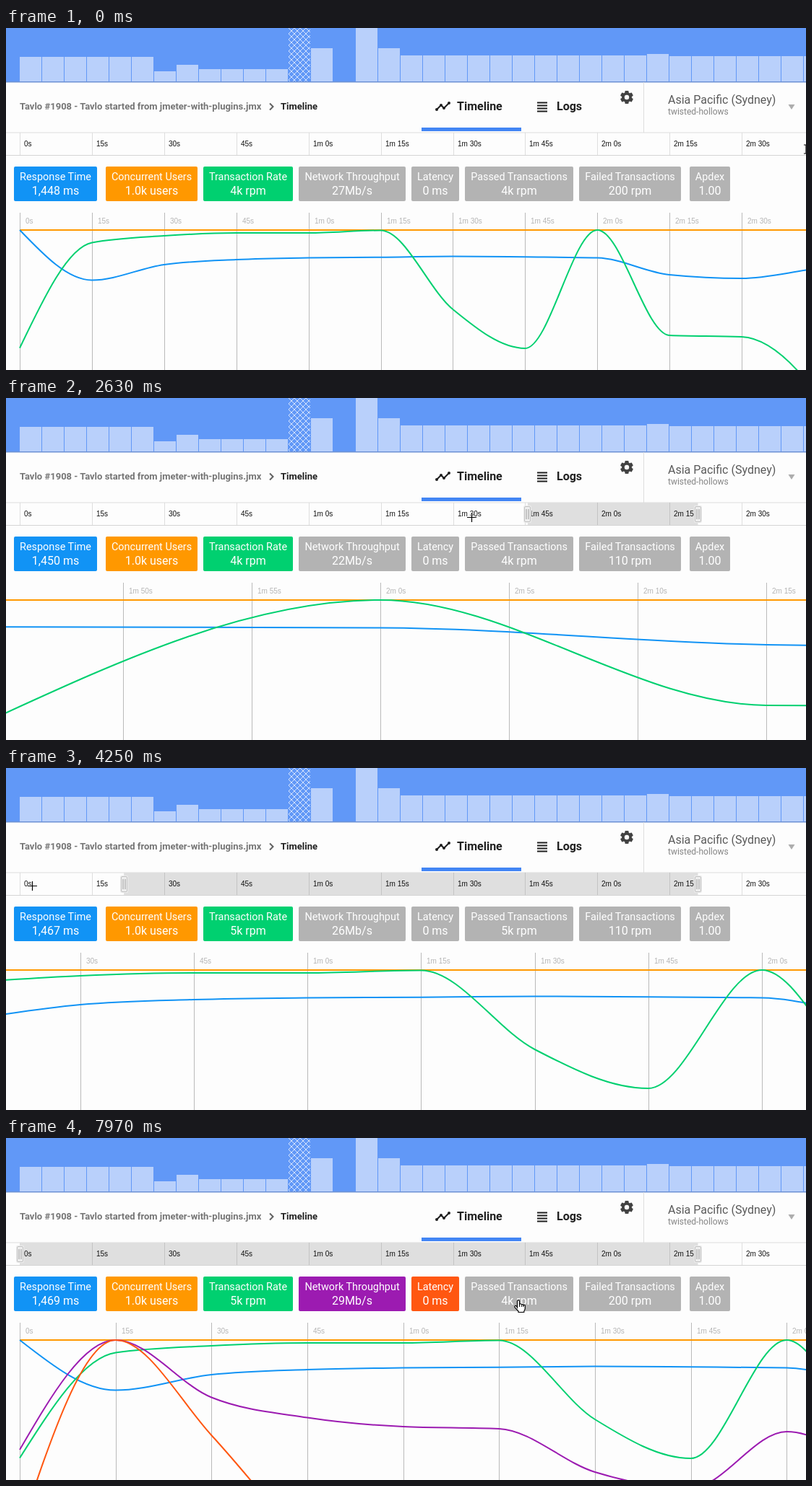
Write an HTML page that moves like this. It is 1107x474 px and loops after 8000 ms.

```html
<!DOCTYPE html>
<html lang="en">
<head>
<meta charset="utf-8">
<title>Timeline</title>
<style>
  html, body { margin: 0; width: 100%; height: 100%; overflow: hidden; background: #fdfdfd; }
  svg { display: block; width: 100%; height: 100%; }
  text { font-family: Roboto, sans-serif; white-space: pre; }
  .axis { font: 10px "Liberation Sans", Arial, sans-serif; }
  .curve { fill: none; stroke-width: 2; }
</style>
</head>
<body>
<svg viewBox="0 0 1107 474">
  <defs>
    <pattern id="hatch" x="391" width="8" height="8" patternUnits="userSpaceOnUse">
      <path d="M0 0L8 8M8 0L0 8" stroke="#d5e3fd"/>
    </pattern>
  </defs>
  <g id="fixed"></g>
  <g id="live"></g>
</svg>
<script>
const LOOP = 8000, TICK = 147.6;
const LEFT = 19, SPAN = 1247, PX_PER_S = 6.66, SEL_END = 957.5, SAMPLE = 15;
const DRAG = 1885, NETWORK_ON = 6160, LATENCY_ON = 7340;
const GREY = '#b3b3b3', DARK = '#212121';

// Key points: time, then values
const HANDLE = [[DRAG, 950], [2036, 925], [3217, 519], [3808, 305], [4700, LEFT]];
const POINTER = [
  [0, 1107, 168], [860, 707, 166], [1290, 707, 166], [1590, 965, 166], [2036, 865, 167],
  [3217, 423, 164], [3808, 203, 163], [4400, -20, 163], [5060, -20, 170],
  [5870, 491, 235], [6500, 491, 235], [6760, 608, 237], [LATENCY_ON, 608, 237], [7940, 711, 233]
];
// Response ms, transactions k, network Mb, passed k, failed tens
const STATS = [
  [2036, 1448, 4, 27, 4, 20], [3217, 1452, 4, 18, 4, 2],
  [3808, 1465, 5, 24, 5, 4], [4840, 1469, 5, 29, 4, 20]
];

// One height per sample
const SERIES = {
  users: { color: '#ff9800', from: 0, y: Array(13).fill(280) },
  response: { color: '#1193f5', from: 0, y: [280, 349.5, 328, 321, 318.5, 317.7, 316.5, 317.3, 318.5, 342, 347, 334, 322] },
  rate: { color: '#00d070', from: 0, y: [443.5, 297.5, 288, 284, 284, 280.5, 390, 444, 280, 426, 428, 502, 690] },
  network: { color: '#9c1bb1', from: NETWORK_ON, y: [432, 280, 359.5, 387.5, 400, 403, 463, 485, 407, 480] },
  latency: { color: '#ff5711', from: LATENCY_ON, y: [545, 280, 412, 570] }
};
const CARDS = [
  ['Response Time', 11, 115, 'response'], ['Concurrent Users', 138, 127, 'users'],
  ['Transaction Rate', 273, 124, 'rate'], ['Network Throughput', 405, 148, 'network'],
  ['Latency', 561, 66, 'latency'], ['Passed Transactions', 635, 150],
  ['Failed Transactions', 793, 141], ['Apdex', 946, 56]
];

const rect = (x, y, w, h, fill, extra = '') =>
  `<rect x="${x}" y="${y}" width="${w}" height="${h}" fill="${fill}" ${extra}/>`;
const line = (d, stroke, width = 1) =>
  `<path d="${d}" fill="none" stroke="${stroke}" stroke-width="${width}"/>`;
const text = (s, x, y, size, fill, extra = '') =>
  `<text x="${x}" y="${y}" font-size="${size}" fill="${fill}" ${extra}>${s}</text>`;
const axisText = (s, x, y, fill) => `<text class="axis" x="${x}" y="${y}" fill="${fill}">${s}</text>`;

function at(keys, t, col = 1) {
  const i = keys.findIndex(k => k[0] >= t);
  if (i < 0) return keys[keys.length - 1][col];
  if (i === 0) return keys[0][col];
  const a = keys[i - 1], b = keys[i];
  return a[col] + (b[col] - a[col]) * (t - a[0]) / (b[0] - a[0]);
}

// The screen refreshes at a fixed, coarse rate
const snap = t => Math.max(0, Math.floor((t + 40) / TICK) * TICK - 30);

function clock(s) {
  s = Math.floor(s + 1e-6);
  return (s < 60 ? '' : Math.floor(s / 60) + 'm ') + s % 60 + 's';
}

// Monotone cubic through evenly spaced points
function slopes(y) {
  const d = y.slice(1).map((v, i) => v - y[i]), n = d.length;
  if (n < 2) return [d[0], d[0]];
  const m = [];
  for (let i = 1; i < n; i++) {
    const a = d[i - 1], b = d[i];
    m[i] = (Math.sign(a) + Math.sign(b)) * Math.min(Math.abs(a), Math.abs(b), Math.abs(a + b) / 4);
  }
  m[0] = (3 * d[0] - m[1]) / 2;
  m[n] = (3 * d[n - 1] - m[n - 1]) / 2;
  return m;
}

function curve(series, t0, t1, toX) {
  const first = Math.floor(t0 / SAMPLE);
  const y = series.y.slice(first, Math.ceil(t1 / SAMPLE) + 1);
  if (y.length < 2) return '';
  const m = slopes(y), x = i => toX((first + i) * SAMPLE);
  let d = `M${x(0)} ${y[0]}`;
  for (let i = 1; i < y.length; i++) {
    d += `C${x(i - 2 / 3)} ${y[i - 1] + m[i - 1] / 3} ${x(i - 1 / 3)} ${y[i] - m[i] / 3} ${x(i)} ${y[i]}`;
  }
  return `<path class="curve" d="${d}" stroke="${series.color}"/>`;
}

function banner() {
  const odd = { 6: 60, 7: 51, 12: 74, 13: 28, 14: 74, 15: 0, 16: 28, 28: 36 };
  const usual = i => i < 6 ? 40 : i < 12 ? 57 : i < 28 ? 38 : 39;
  let s = rect(0, 0, 1107, 75, '#6198f7');
  for (let i = 0; i < 36; i++) {
    const top = odd[i] ?? usual(i);
    s += rect(LEFT + 31 * i, top, 30, 74 - top, '#b9d0fb');
  }
  return s + rect(391, 0, 30, 74, 'url(#hatch)') + rect(0, 74, 1107, 1.5, '#6b90d4');
}

function gear(x, y) {
  let s = `<circle cx="${x}" cy="${y}" r="7" fill="#424242"/>`;
  for (const a of [0, 60, 120]) {
    s += rect(x - 2.6, y - 9, 5.2, 18, '#424242', `rx="1" transform="rotate(${a} ${x} ${y})"`);
  }
  return s + `<circle cx="${x}" cy="${y}" r="3.2" fill="#fdfdfd"/>`;
}

function header() {
  const bold = 'font-weight="700"';
  const dots = [[596, 113], [602, 107], [606, 111], [613, 104]];
  return text('Tavlo #1908 - Tavlo started from jmeter-with-plugins.jmx', 19, 113, 13, '#757575', bold) +
    line('M365 104.5L369.5 109L365 113.5', '#616161', 2) +
    text('Timeline', 380, 113, 13, DARK, bold) +
    line('M' + dots.join('L'), DARK, 2) +
    dots.map(([x, y]) => `<circle cx="${x}" cy="${y}" r="2" fill="${DARK}"/>`).join('') +
    text('Timeline', 624, 114, 16, DARK, bold) +
    rect(575, 138, 138, 5, '#4285f4') +
    line('M735 103.500h14m-14 4h14m-14 4h14m-14 4h14', DARK, 2) +
    text('Logs', 762, 114, 16, DARK, bold) +
    gear(859, 96) +
    rect(882, 75, 1, 70, '#dedede') +
    text('Asia Pacific (Sydney)', 916, 105, 16, '#5a5a5a') +
    text('twisted-hollows', 916, 120, 12, '#858585') +
    '<path d="M1082.5 106h9l-4.5 7z" fill="#adadad"/>' +
    rect(0, 144.5, 1107, 1, '#dedede') + rect(0, 176, 1107, 1, '#d4d4d4');
}

function grip(x) {
  x = Math.round(x - .5) + .5;
  return rect(x - 5.5, 149, 11, 24, '#ececec', 'rx="2"') +
    rect(x - 4, 150.5, 8, 21, '#eee', 'rx="1.5" stroke="#c2c2c2"') +
    line(`M${x - 1.5} 154v14M${x + 1.5} 154v14`, '#999');
}

function ruler(t) {
  const on = t >= DRAG, x = at(HANDLE, t);
  let s = on ? rect(x, 145, SEL_END - x, 31, '#dfdfdf') : '';
  for (let i = 0; i < 11; i++) {
    const tx = Math.round(LEFT + SAMPLE * i * PX_PER_S + .15);
    s += rect(tx, 145, 1, 31, on && tx > x && tx < SEL_END ? '#c4c4c4' : '#dedede') +
      axisText(clock(SAMPLE * i), tx + 6, 164, '#111');
  }
  return on ? s + grip(x) + grip(SEL_END) : s;
}

function chart(t) {
  const toTime = x => Math.round((x - LEFT) / PX_PER_S);
  const on = t >= DRAG;
  const t0 = on ? toTime(at(HANDLE, t)) : 0;
  const t1 = on ? toTime(SEL_END) : SPAN / PX_PER_S;
  const toX = s => +(LEFT + (s - t0) / (t1 - t0) * SPAN).toFixed(2);
  const far = v => Math.abs(Math.log(v * 10 / (t1 - t0)));
  const step = [.1, .2, .5, 1, 5, 15].reduce((a, b) => far(b) < far(a) ? b : a);
  let s = '';
  for (let k = Math.ceil(t0 / step - .02); toX(k * step) < 1107; k++) {
    const x = Math.round(toX(k * step));
    s += rect(x, 256, 1, 218, '#bababa') + axisText(clock(k * step), x + 8, 271, '#b5b5b5');
  }
  for (const c of Object.values(SERIES)) if (t >= c.from) s += curve(c, t0, t1, toX);
  return s;
}

function cards(t) {
  const stat = col => Math.round(at(STATS, t, col));
  const values = [
    stat(1).toLocaleString('en-US') + ' ms', '1.0k users', stat(2) + 'k rpm', stat(3) + 'Mb/s',
    '0 ms', stat(4) + 'k rpm', stat(5) * 10 + ' rpm', '1.00'
  ];
  const center = 'text-anchor="middle"';
  return CARDS.map(([name, x, w, key], i) => {
    const c = SERIES[key], mid = x + w / 2;
    return rect(x, 192, w, 48, c && t >= c.from ? c.color : GREY, 'rx="2"') +
      text(name, mid, 211, 14.4, '#fff', center) + text(values[i], mid, 231, 16, '#fff', center);
  }).join('');
}

const SHAPES = {
  beam: 'M-3 -6H3M0 -6V6M-3 6H3',
  cross: 'M-6 .5H7M.5 -6V7',
  resize: 'M-6 0H6M-3.5 -3L-7 0L-3.5 3ZM3.5 -3L7 0L3.5 3Z',
  arrow: 'M-4 -8V6L-1 3.5L1 8L3 7L1 3H5Z',
  hand: 'M-3.5 2V-6.8a1.5 1.5 0 0 1 3 0V-2a1.4 1.4 0 0 1 2.8 .3a1.4 1.4 0 0 1 2.6 .6' +
    'a1.3 1.3 0 0 1 2.4 .9V3q0 2 -1.5 4v1.5H-2V7L-6.8 1.8a1.4 1.4 0 0 1 2 -2z'
};

function pointer(t) {
  const x = Math.round(at(POINTER, t)), y = Math.round(at(POINTER, t, 2));
  const kind = t === 0 ? 'beam' : t >= DRAG && t < 2150 ? 'resize' : y < 177 ? 'cross' : y < 192 ? 'arrow' : 'hand';
  const d = SHAPES[kind];
  let body;
  if (kind === 'hand' || kind === 'arrow') {
    body = `<path d="${d}" fill="#fff" stroke="#000" stroke-width="1.2"/>`;
    if (kind === 'hand') body += line('M-.5 -2V1M2.3 -1.5V1M4.9 -.8V1', '#000');
  } else {
    body = line(d, '#fff', 2.6) + `<path d="${d}" fill="#000" stroke="#000" stroke-width="1.2"/>`;
  }
  return `<g transform="translate(${x} ${y})">${body}</g>`;
}

document.getElementById('fixed').innerHTML = banner() + header();
const live = document.getElementById('live');
const start = performance.now();
let shown = -1;

function draw() {
  const t = snap((performance.now() - start) % LOOP);
  if (t !== shown) {
    shown = t;
    live.innerHTML = ruler(t) + chart(t) + cards(t) + pointer(t);
  }
  requestAnimationFrame(draw);
}
draw();
</script>
</body>
</html>
```
